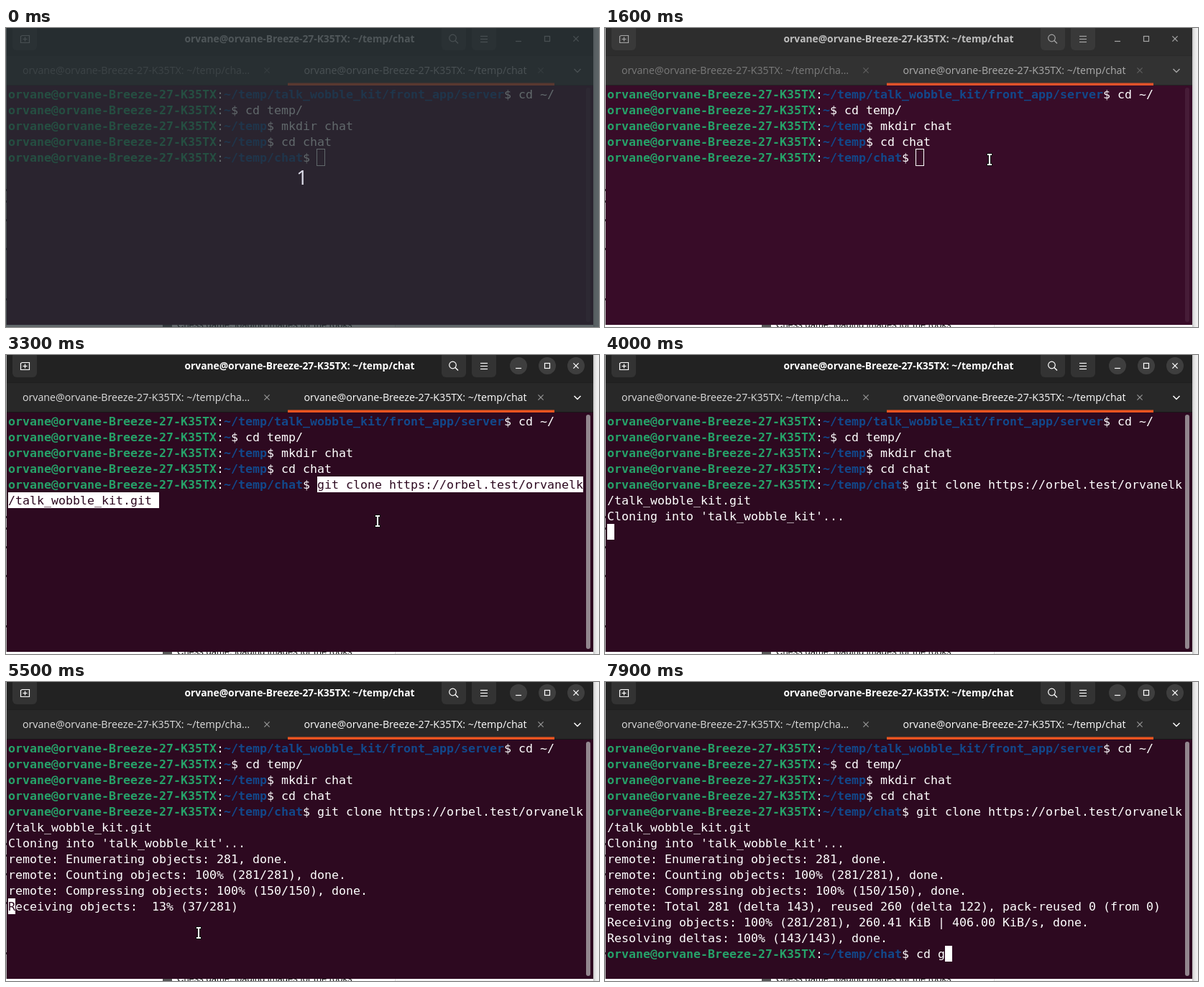
An HTML page with a canvas for the animation above (8 s loop, 825x416 px).

```html
<!DOCTYPE html>
<html lang="en">
<head>
<meta charset="utf-8">
<title>Terminal</title>
<style>
html, body { margin: 0; width: 100%; height: 100%; overflow: hidden; background: #f4f4f4; }
canvas { display: block; }
</style>
</head>
<body>
<canvas id="stage" width="825" height="416"></canvas>
<script>
const ctx = document.getElementById('stage').getContext('2d');
const LOOP = 8000, STEP = 100;
const CELL = 10, ROW = 22, LEFT = 3, TOP = 81;
const MONO = '"DejaVu Sans Mono", monospace';
const SANS = '"Open Sans", sans-serif';
const WHITE = '#ffffff', GREEN = '#26a269', BLUE = '#12488b';

const HOST = 'orvane@orvane-Breeze-27-K35TX';
const REPO = 'talk_wobble_kit';
const CLONE = 'git clone https://orbel.test/orvanelk';
const TITLE = HOST + ': ~/temp/chat';

// [time, x, y]: the pointer moves straight between these
const PATH_IN = [
  [500, 12, 114], [1200, 503, 222], [1400, 503, 222], [1500, 536, 181],
  [1600, 535, 183], [1700, 535, 184], [1800, 535, 184], [2200, 517, 231], [3900, 517, 231]
];
const PATH_BACK = [
  [4900, 517, 230], [5000, 517, 231], [5100, 517, 231], [5500, 268, 349], [7100, 268, 349]
];

const lerp = (a, b, k) => a + (b - a) * k;
const mix = (a, b, k) => `rgb(${a.map((v, i) => Math.round(lerp(v, b[i], k))).join(',')})`;
const grey = (a, b, k) => mix([a, a, a], [b, b, b], k);

function rect(x, y, w, h, color) {
  ctx.fillStyle = color;
  ctx.fillRect(x, y, w, h);
}

function pill(x, y, w, h, r, color) {
  ctx.fillStyle = color;
  ctx.beginPath();
  ctx.roundRect(x, y, w, h, r);
  ctx.fill();
}

function line(points, color, width = 1) {
  ctx.strokeStyle = color;
  ctx.lineWidth = width;
  ctx.beginPath();
  points.forEach(([x, y], i) => i ? ctx.lineTo(x, y) : ctx.moveTo(x, y));
  ctx.stroke();
}

function label(text, x, y, font, color, align = 'left') {
  ctx.font = font;
  ctx.fillStyle = color;
  ctx.textAlign = align;
  ctx.fillText(text, x, y);
}

function cross(x, y, r, color, width) {
  line([[x - r, y - r], [x + r, y + r]], color, width);
  line([[x - r, y + r], [x + r, y - r]], color, width);
}

function page() {
  rect(0, 0, 825, 416, '#f6f6f6');
  rect(0, 413, 541, 3, '#ffffff');
  rect(541, 413, 1, 3, '#dddddd');
  const shade = ctx.createLinearGradient(817, 0, 825, 0);
  shade.addColorStop(0, '#c4c4c4');
  shade.addColorStop(0.4, '#e6e6e6');
  shade.addColorStop(1, '#f4f4f4');
  ctx.fillStyle = shade;
  ctx.fillRect(817, 0, 8, 416);
  label('🙰 Chess game, loading images for the rooks'.slice(3), 238, 417, '13px "Liberation Sans", sans-serif', '#111');
  rect(218, 412, 13, 4, '#555');
  rect(0, 0, 1, 413, '#b8b8b8');
  for (const y of [224, 240, 266, 306, 376]) rect(0, y, 1, 3, '#333');
}

function header(focus) {
  const icon = grey(165, 255, focus);
  const faint = grey(95, 150, focus);
  const button = grey(57, 51, focus);
  rect(1, 0, 816, 38, grey(45, 34, focus));
  rect(1, 38, 816, 42, grey(50, 40, focus));
  rect(1, 38, 816, 1, grey(42, 31, focus));
  rect(1, 79, 816, 1, grey(36, 24, focus));

  for (const x of [9, 606, 648]) pill(x, -4, 34, 35, 6, button);
  ctx.strokeStyle = icon;
  ctx.lineWidth = 1.2;
  ctx.beginPath();
  ctx.moveTo(20.5, 20.5);
  ctx.lineTo(20.5, 11.5);
  ctx.lineTo(22.5, 10.5);
  ctx.lineTo(32.5, 10.5);
  ctx.lineTo(32.5, 20.5);
  ctx.closePath();
  ctx.stroke();
  line([[23.5, 15.5], [29.5, 15.5]], icon, 1.2);
  line([[26.5, 12.5], [26.5, 18.5]], icon, 1.2);

  ctx.beginPath();
  ctx.arc(621.5, 14, 4.8, 0, Math.PI * 2);
  ctx.stroke();
  line([[625, 17.5], [629, 21.5]], icon, 1.4);
  for (const y of [11.5, 15.5, 19.5]) line([[660, y], [670, y]], icon, 1.2);

  for (const x of [713, 753, 793]) {
    ctx.fillStyle = `rgba(62,62,62,${focus})`;
    ctx.beginPath();
    ctx.arc(x, 15, 12, 0, Math.PI * 2);
    ctx.fill();
  }
  line([[709, 18.5], [717, 18.5]], icon, 1.2);
  ctx.strokeStyle = icon;
  ctx.strokeRect(749.5, 11.5, 7, 7);
  cross(793, 15, 3.6, icon, 1.3);

  label(TITLE, 408.5, 20, `bold 13.8px ${SANS}`, grey(190, 255, focus), 'center');
  label(TITLE.slice(0, -1) + '…', 23, 64, `14.2px ${SANS}`, grey(122, 222, focus));
  label(TITLE, 569.5, 64, `14.2px ${SANS}`, grey(172, 255, focus), 'center');
  cross(363, 59, 3.6, faint, 1.2);
  cross(744, 59, 3.6, faint, 1.2);
  line([[790.5, 57], [795, 61.5], [799.5, 57]], icon, 1.5);
  rect(392, 76.5, 371, 3.5, mix([225, 82, 42], [233, 84, 32], focus));
}

// Each glyph sits in its own cell of the terminal grid
function cells(text, col, row, color, bold) {
  ctx.font = `${bold ? 'bold ' : ''}16.6px ${MONO}`;
  ctx.fillStyle = color;
  ctx.textAlign = 'left';
  [...text].forEach((ch, i) => {
    if (ch !== ' ') ctx.fillText(ch, LEFT + (col + i) * CELL, TOP + row * ROW + 17);
  });
}

function block(col, row, count) {
  rect(LEFT + col * CELL, TOP + row * ROW, count * CELL, ROW, WHITE);
}

function marked(text, col, row, back) {
  block(col, row, text.length);
  cells(text, col, row, back);
}

function prompt(row, path, command = '') {
  cells(HOST, 0, row, GREEN, true);
  cells(':', 29, row, WHITE);
  cells(path, 30, row, BLUE, true);
  cells('$ ' + command, 30 + path.length, row, WHITE);
}

function output(t) {
  if (t < 4000) return [];
  const lines = [`Cloning into '${REPO}'...`];
  if (t >= 5200) lines.push('remote: Enumerating objects: 281, done.');
  if (t >= 5300) lines.push('remote: Counting objects: 100% (281/281), done.');
  if (t >= 5400) lines.push('remote: Compressing objects: 100% (150/150), done.');
  if (t >= 6100) {
    lines.push(
      'remote: Total 281 (delta 143), reused 260 (delta 122), pack-reused 0 (from 0)',
      'Receiving objects: 100% (281/281), 260.41 KiB | 406.00 KiB/s, done.',
      t < 6200 ? 'Resolving deltas:  62% (89/143)' : 'Resolving deltas: 100% (143/143), done.'
    );
  } else if (t >= 5500) {
    lines.push('Receiving objects:  13% (37/281)');
  }
  return lines;
}

function typed(t) {
  const count = [7200, 7400, 7600, 7900].filter(at => t >= at).length;
  return 'cd g'.slice(0, count);
}

// Block cursor: column, row and the letter beneath it
function cursor(t) {
  if (t < 3300) return [43, 4];
  if (t < 4000) return [20, 5];
  if (t < 5200) return t < 4600 ? [0, 7] : null;
  if (t < 5300) return [0, 8];
  if (t < 5400) return [0, 9];
  if (t < 5500) return [0, 10];
  if (t < 5800) return [0, 10, 'R'];
  if (t < 6400 || (t >= 7000 && t < 7200)) return null;
  return [43 + typed(t).length, 13];
}

function terminal(t, focus) {
  const back = mix([56, 12, 40], [45, 9, 32], focus);
  rect(1, 80, 816, 333, back);
  pill(807, 83, 6, 326, 3, mix([70, 28, 55], [146, 134, 142], focus));

  prompt(0, `~/temp/${REPO}/front_app/server`, 'cd ~/');
  prompt(1, '~', 'cd temp/');
  prompt(2, '~/temp', 'mkdir chat');
  prompt(3, '~/temp', 'cd chat');
  prompt(4, '~/temp/chat');
  if (t >= 3300) {
    const rest = `/${REPO}.git`;
    const draw = t < 4000 ? marked : (s, col, row) => cells(s, col, row, WHITE);
    draw(CLONE, 43, 4, back);
    draw(rest, 0, 5, back);
  }
  output(t).forEach((s, i) => cells(s, 0, 6 + i, WHITE));
  if (t >= 6200) prompt(13, '~/temp/chat', typed(t));

  const at = cursor(t);
  if (!at) return;
  if (t < 1900) {
    ctx.strokeStyle = WHITE;
    ctx.lineWidth = 1;
    ctx.strokeRect(432.5, 168.5, 11, 23);
    return;
  }
  block(at[0], at[1], 1);
  if (at[2]) cells(at[2], at[0], at[1], back);
}

function countdown() {
  rect(0, 0, 825, 416, 'rgba(36,46,51,0.72)');
  label('1', 412, 218, `28px ${SANS}`, '#dedeea', 'center');
}

function along(path, t) {
  const i = path.findIndex(key => key[0] >= t);
  if (i < 0 || t < path[0][0]) return null;
  if (i === 0) return path[0].slice(1);
  const [t0, x0, y0] = path[i - 1], [t1, x1, y1] = path[i];
  const k = (t - t0) / (t1 - t0);
  return [Math.round(lerp(x0, x1, k)), Math.round(lerp(y0, y1, k))];
}

function pointer(t) {
  const at = along(PATH_IN, t) || along(PATH_BACK, t);
  if (!at) return;
  const [x, y] = at;
  rect(x - 4, y - 9, 8, 4, '#111');
  rect(x - 4, y + 5, 8, 4, '#111');
  rect(x - 2, y - 7, 4, 14, '#111');
  rect(x - 3, y - 8, 6, 2, WHITE);
  rect(x - 3, y + 6, 6, 2, WHITE);
  rect(x - 1, y - 7, 2, 14, WHITE);
}

function frame() {
  const t = Math.floor(performance.now() % LOOP / STEP) * STEP;
  const focus = Math.min(1, Math.max(0, (t - 1800) / 400));
  page();
  header(focus);
  terminal(t, focus);
  if (t < 1600) countdown();
  pointer(t);
  requestAnimationFrame(frame);
}
requestAnimationFrame(frame);
</script>
</body>
</html>
```
